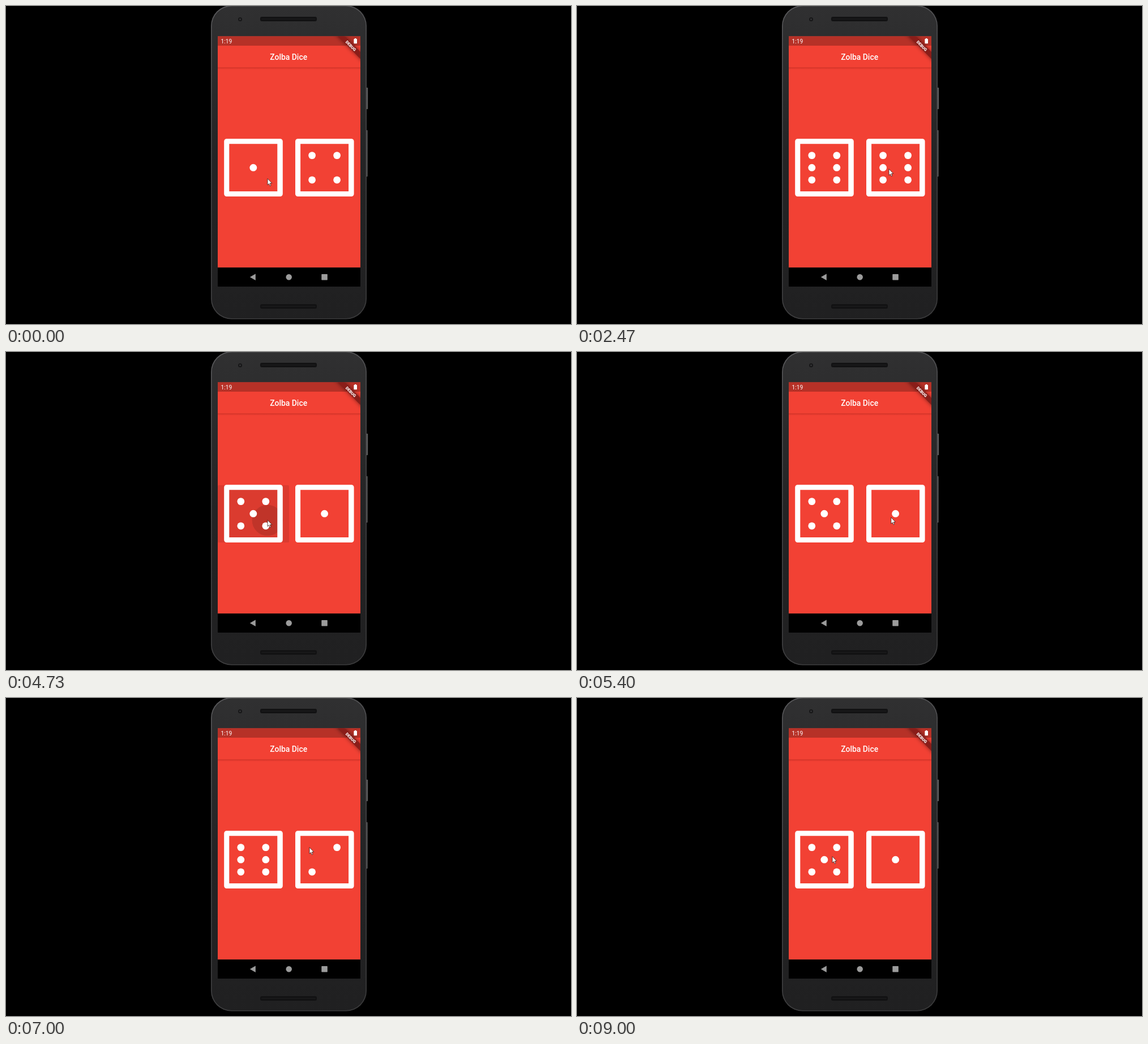
These frames come from a looping animation (998x561 px, 9.54 s). An HTML page with a canvas:

```html
<!DOCTYPE html>
<html lang="en">
<head>
<meta charset="utf-8">
<title>Dice</title>
<style>
html, body { margin: 0; width: 100%; height: 100%; overflow: hidden; background: #000; }
canvas { display: block; }
</style>
</head>
<body>
<canvas id="stage" width="998" height="561"></canvas>
<script>
const canvas = document.getElementById('stage');
const ctx = canvas.getContext('2d');
const LOOP = 9540;
const STEP = 1000 / 15;
const RED = '#f24134';

// Each tap rolls both dice; the ripple spreads on the tapped side.
const taps = [
  { at: 533, x: 462, y: 305, dice: [3, 2], fade: 330 },
  { at: 1800, x: 551, y: 288, dice: [4, 3], fade: 260 },
  { at: 2466, x: 551, y: 288, dice: [6, 6], fade: 330 },
  { at: 3866, x: 462, y: 297, dice: [3, 1], fade: 330 },
  { at: 4600, x: 462, y: 297, dice: [5, 1], fade: 330 },
  { at: 6000, x: 578, y: 272, dice: [6, 2], fade: 330 },
  { at: 7333, x: 536, y: 264, dice: [4, 4], fade: 330 },
  { at: 8533, x: 451, y: 280, dice: [5, 1], fade: 400 }
];

// Pointer moves: start, end, target x, target y
const moves = [
  [860, 1400, 551, 288],
  [2935, 3533, 462, 297],
  [4930, 5533, 581, 291],
  [5533, 5733, 578, 272],
  [6400, 6800, 536, 264],
  [7600, 7866, 506, 264],
  [7866, 8266, 451, 280]
];

function box(c, x, y, w, h, fill, r = 0) {
  c.fillStyle = fill;
  c.beginPath();
  c.roundRect(x, y, w, h, r);
  c.fill();
}

function disc(c, x, y, r, fill) {
  c.fillStyle = fill;
  c.beginPath();
  c.arc(x, y, r, 0, Math.PI * 2);
  c.fill();
}

function poly(c, points, fill) {
  c.fillStyle = fill;
  c.beginPath();
  points.forEach(([x, y]) => c.lineTo(x, y));
  c.closePath();
  c.fill();
}

function label(c, text, x, y, font, align) {
  c.font = font;
  c.textAlign = align;
  c.fillStyle = '#fff';
  c.fillText(text, x, y);
}

function drawBody(c) {
  box(c, 0, 0, 998, 561, '#000');
  box(c, 636, 144, 3.2, 38, '#5c5c5d', 1);
  box(c, 636, 219, 2.6, 82, '#5c5c5d', 1);

  const rim = c.createLinearGradient(362, 0, 637, 552);
  rim.addColorStop(0, '#58585a');
  rim.addColorStop(0.5, '#444446');
  rim.addColorStop(1, '#3a3a3b');
  box(c, 362, -1, 275, 553.5, rim, 36);

  const shell = c.createLinearGradient(0, 0, 0, 552);
  shell.addColorStop(0, '#303031');
  shell.addColorStop(0.5, '#242425');
  shell.addColorStop(1, '#202021');
  box(c, 363.6, 0.5, 271.8, 550.5, shell, 35);

  for (const y of [19, 526]) {
    box(c, 449, y, 100, 8, '#121213', 3);
    box(c, 451, y + 3, 96, 2, '#19191a', 1);
  }
  disc(c, 413.5, 23.5, 3.5, '#171718');
  disc(c, 413.5, 23.5, 1.4, '#363638');
}

function drawRibbon(c) {
  c.save();
  c.beginPath();
  c.rect(374, 53.5, 252, 441);
  c.clip();
  c.translate(626, 53.5);
  c.rotate(Math.PI / 4);
  c.shadowColor = 'rgba(0,0,0,0.5)';
  c.shadowBlur = 7;
  box(c, -45, 19.5, 90, 8.6, '#8a1d19');
  c.shadowBlur = 0;
  c.shadowColor = 'transparent';
  label(c, 'DEBUG', 0, 26.4, '900 7.2px Roboto, sans-serif', 'center');
  c.restore();
}

function drawScreen(c) {
  box(c, 374, 53.5, 252, 408, RED);
  box(c, 374, 53.5, 252, 16.5, '#b63127');
  const shade = c.createLinearGradient(0, 108, 0, 112);
  shade.addColorStop(0, 'rgba(90,0,0,0.24)');
  shade.addColorStop(1, 'rgba(90,0,0,0)');
  box(c, 374, 108.3, 252, 3.7, shade);

  label(c, '1:19', 379.5, 65.7, '10.2px Roboto, sans-serif', 'left');
  label(c, 'Zolba Dice', 499.2, 94.6, '500 13.9px Roboto, sans-serif', 'center');
  drawRibbon(c);
  box(c, 614.4, 58, 5.6, 8.3, '#fff', 0.8);
  box(c, 616, 57, 2.4, 1.5, '#fff');

  box(c, 374, 461.5, 252, 33.5, '#000');
  poly(c, [[430.8, 478.2], [440.8, 472.5], [440.8, 484]], '#9c9c9c');
  disc(c, 499.7, 478.2, 5.2, '#9c9c9c');
  box(c, 557.3, 473, 10.5, 10.5, '#9c9c9c', 0.8);
}

function drawPress(tap, age) {
  const left = tap.x < 500 ? 374 : 500;
  const glow = Math.max(0, Math.min(age / 130, 1 - (age - 133) / 95, 1));
  const fade = Math.max(0, Math.min(1, (tap.fade - age) / (tap.fade - 200)));
  const radius = age * (0.135 + 0.000525 * age);
  ctx.save();
  ctx.beginPath();
  ctx.roundRect(left, 235, 126, 101, 1.5);
  ctx.clip();
  box(ctx, left, 235, 126, 101, `rgba(0,0,0,${0.095 * glow})`);
  disc(ctx, tap.x, tap.y, radius, `rgba(0,0,0,${0.125 * fade})`);
  ctx.restore();
}

function drawDie(x, face) {
  ctx.fillStyle = '#fff';
  ctx.beginPath();
  ctx.roundRect(x, 234.3, 103.6, 101.7, 4.5);
  ctx.rect(x + 9.1, 243.3, 85, 83.7);
  ctx.fill('evenodd');

  const pip = (col, row) =>
    disc(ctx, x + 51.6 + 22 * col, 285.2 + 21.6 * row, 6.4, '#fff');
  if (face % 2) pip(0, 0);
  if (face > 1) { pip(-1, 1); pip(1, -1); }
  if (face > 3) { pip(-1, -1); pip(1, 1); }
  if (face === 6) { pip(-1, 0); pip(1, 0); }
}

function pointerAt(t) {
  let x = 462, y = 305;
  for (const [start, end, tx, ty] of moves) {
    if (t <= start) break;
    const k = Math.min(1, (t - start) / (end - start));
    x += (tx - x) * k;
    y += (ty - y) * k;
  }
  return [x, y];
}

function drawPointer(x, y) {
  const shape = [[0, 0], [0, 11.2], [2.5, 8.9], [4.2, 12.9],
    [6, 12.1], [4.3, 8.3], [7.8, 8.1]];
  ctx.save();
  ctx.translate(x, y - 0.5);
  poly(ctx, shape, '#fff');
  ctx.strokeStyle = '#3a1512';
  ctx.lineWidth = 0.8;
  ctx.lineJoin = 'round';
  ctx.stroke();
  ctx.restore();
}

const backdrop = document.createElement('canvas');
backdrop.width = canvas.width;
backdrop.height = canvas.height;
const back = backdrop.getContext('2d');
drawBody(back);
drawScreen(back);

function render(now) {
  const t = Math.floor((now % LOOP + 5) / STEP) * STEP;
  const tap = taps.filter(p => p.at <= t).pop();
  ctx.drawImage(backdrop, 0, 0);
  if (tap && t - tap.at < tap.fade) drawPress(tap, t - tap.at);
  const [a, b] = tap ? tap.dice : [1, 4];
  drawDie(385.2, a);
  drawDie(511, b);
  drawPointer(...pointerAt(t));
}

const begin = performance.now();
function tick() {
  render(performance.now() - begin);
  requestAnimationFrame(tick);
}
tick();
</script>
</body>
</html>
```
